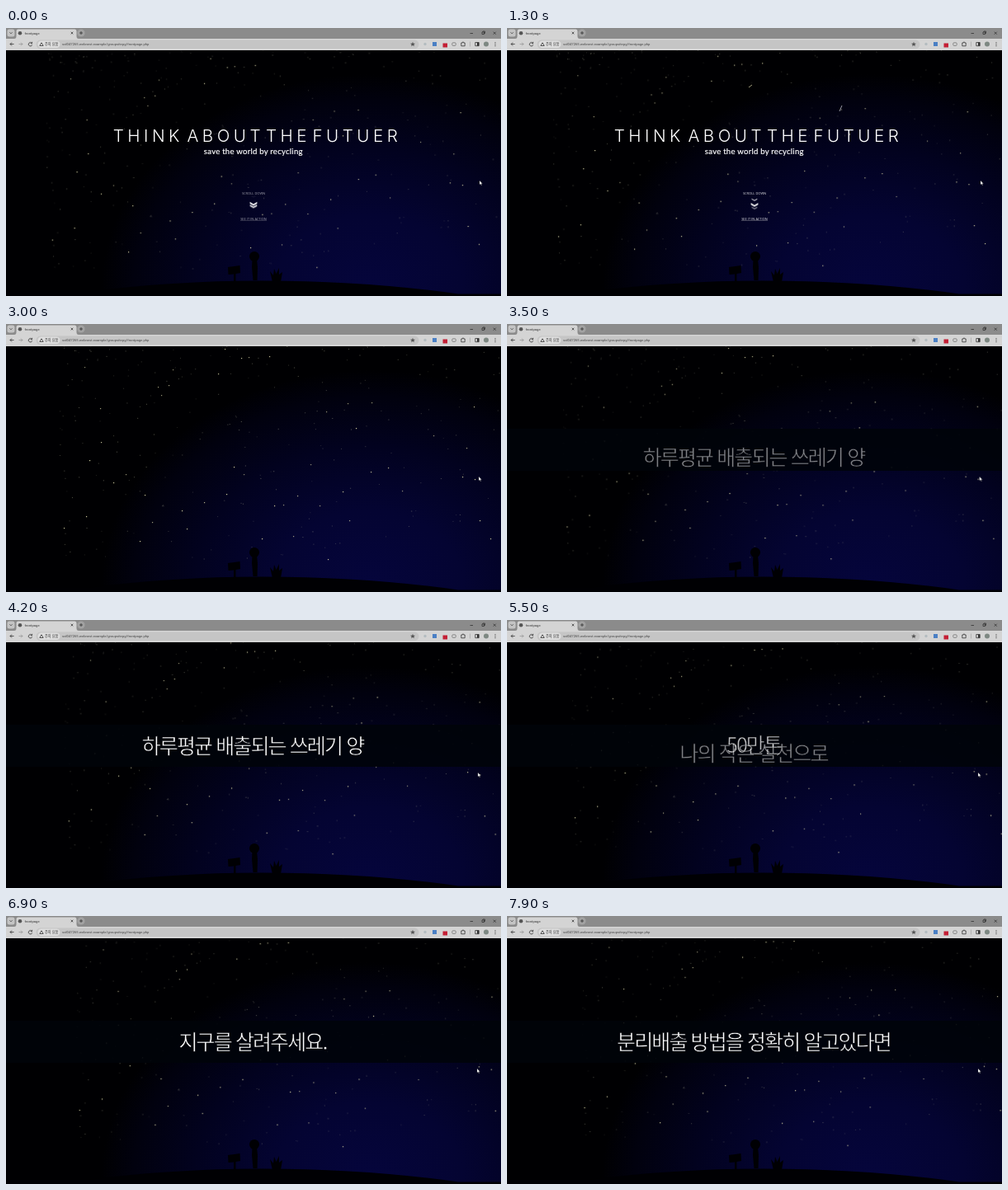
Animation of 600 by 325 pixels, one loop 8 s. Source, as an HTML page:

```html
<!DOCTYPE html>
<html lang="ko">
<head>
<meta charset="utf-8">
<title>Night sky</title>
<style>
  html, body { margin: 0; width: 100%; height: 100%; overflow: hidden; background: #000; }
  svg { display: block; width: 600px; height: 325px; }

  .ui { font: 4.2px Roboto, "Noto Sans CJK KR", sans-serif; fill: #333; }
  .icon { fill: none; stroke: #333; stroke-width: .8; }
  .mid { text-anchor: middle; fill: #fff; }
  .title { font: 300 20.6px Inter, sans-serif; letter-spacing: 4.5px; }
  .sub { font: 9.6px Lato, sans-serif; letter-spacing: .24px; stroke: #fff; stroke-width: .2; }
  .hint { font: 4px "Open Sans", sans-serif; }
  /* the dark outline thins the strokes of the letters */
  .line {
    font: 300 25px "Noto Sans CJK KR Light", "Noto Sans CJK KR", "Noto Sans CJK", sans-serif;
    letter-spacing: -1.9px; stroke: #01040a; stroke-width: .5;
  }

  .stars { transform-origin: 700px 1200px; animation: turn 8s linear both; }
  .hero { animation: leave .5s linear 2s both; }
  .pulse { animation: pulse 2s linear -1s infinite alternate; }
  .band { animation: appear .2s linear 3.3s both; }
  .line { animation: pass 1.3s linear both; }
  .chev { animation: sink 3s ease-out infinite; }
  .meteor { animation: streak .4s linear 1.1s both; }
  .cursor { animation: drift 3.2s linear 2s both; }

  @keyframes turn { from { transform: rotate(-.86deg); } to { transform: rotate(1.43deg); } }
  @keyframes leave { to { opacity: 0; } }
  @keyframes pulse { from { opacity: .25; } }
  @keyframes appear { from { opacity: 0; } }
  @keyframes pass {
    0% { opacity: 0; transform: translateY(19px); }
    23%, 84.6% { opacity: 1; transform: none; }
    100% { opacity: 0; transform: translateY(-5px); }
  }
  @keyframes sink {
    0% { opacity: 0; transform: scale(.5); }
    25% { opacity: 1; }
    33% { opacity: 1; transform: translateY(9.4px); }
    67% { opacity: 1; transform: translateY(12.5px); }
    100% { opacity: 0; transform: translateY(17.2px) scale(.5); }
  }
  @keyframes streak {
    0% { opacity: 0; transform: translate(2px, -4px); }
    50% { opacity: 1; transform: none; }
    100% { opacity: 0; transform: translate(-2px, 4px); }
  }
  @keyframes drift { to { transform: translateX(-3px); } }
</style>
</head>
<body>
<svg viewBox="0 0 600 325">
  <defs>
    <radialGradient id="glow" gradientUnits="userSpaceOnUse" cx="0" cy="0" r="1"
      gradientTransform="translate(440 318) scale(325 262)">
      <stop offset="0" stop-color="#05053c"/>
      <stop offset=".35" stop-color="#040432"/>
      <stop offset=".65" stop-color="#02021f"/>
      <stop offset=".88" stop-color="#01010e"/>
      <stop offset="1" stop-color="#000002"/>
    </radialGradient>
    <clipPath id="page"><path d="M0 27H600V325H0z"/></clipPath>
    <path id="arrow" d="M-4.4-2.300 0 .2 4.400-2.300V-.2L0 2.300-4.400-.2z" fill="#fff"/>
  </defs>

  <g clip-path="url(#page)">
    <path d="M0 27H600V325H0z" fill="url(#glow)"/>
    <g class="stars" id="stars"></g>
    <path class="meteor" d="M406 94 403 101" stroke="#aaaab4" stroke-width=".9"/>
    <path class="meteor" d="M297 69 293 72" stroke="#b4b08c" stroke-width=".9"/>

    <!-- hill, signpost, child, grass -->
    <g fill="#000003">
      <path d="M0 325V320H100Q200 306.500 310 306.500Q440 307 548 322.500H600V325z"/>
      <path d="M269 290 283.500 288 284 297 278.500 298V308H276V298.500L269.500 299z"/>
      <circle cx="301" cy="277" r="6"/>
      <path d="M298.500 281H304L305 290 304.500 306H299.500L298 290z"/>
      <path d="M320 295 324 300 325 292 327.500 298 331 291 331 299 335 296 333 308H323z"/>
    </g>

    <g class="hero">
      <text class="mid title" y="138">
        <tspan x="172.300">THINK</tspan><tspan x="266.300">ABOUT</tspan><tspan x="342">THE</tspan><tspan x="425.300">FUTUER</tspan>
      </text>
      <text class="mid sub" x="299.800" y="153">save the world by recycling</text>
      <g transform="translate(300 203.500)">
        <use class="chev" href="#arrow" style="animation-delay: -.05s"/>
        <use class="chev" href="#arrow" style="animation-delay: -1.05s"/>
        <use class="chev" href="#arrow" style="animation-delay: -2.05s"/>
      </g>
      <g class="pulse">
        <text class="mid hint" x="300" y="201.800">SCROLL DOWN</text>
        <text class="mid hint" x="300" y="232.700">SEE IT IN ACTION</text>
        <path d="M284 233.500H316" stroke="#bbb" stroke-width=".4"/>
      </g>
    </g>

    <path class="band" d="M0 127H600V178H0z" fill="#01040a" fill-opacity=".88"/>
    <g id="lines"></g>
  </g>

  <!-- browser window -->
  <g class="ui">
    <path d="M0 0H600V14H0z" fill="#8b8b8b"/>
    <path d="M0 13H600V27H0z" fill="#d4d4d4"/>
    <rect x="1.5" y="1.5" width="9" height="9" rx="2.5" fill="#c4c4c4"/>
    <path d="M10 13Q12.5 13 12.5 10V4Q12.5 1.5 15 1.5H83Q85.5 1.5 85.5 4V10Q85.5 13 88 13z" fill="#d4d4d4"/>
    <circle cx="91" cy="6" r="4.6" fill="#a2a2a2"/>
    <circle cx="17" cy="6.3" r="2.3" fill="#555"/>
    <text x="22.5" y="7.8">frontpage</text>
    <g class="icon">
      <path d="M4.5 5.3 6 6.8 7.5 5.3M78.7 4.8 81.3 7.4M81.3 4.8 78.7 7.4M89 6H93M91 4V8"/>
      <path d="M562.5 6.5H566M577 5H579.5V7.5H577zM578 5V4H580.5V6.5H579.5M590.8 4.7 593.8 7.7M593.8 4.7 590.8 7.7"/>
      <path d="M9.5 19.5H5M7 17.5 5 19.5 7 21.5"/>
      <path d="M15.5 19.5H20M18 17.5 20 19.5 18 21.5" stroke="#999"/>
      <path d="M31.3 18.5A2.2 2.2 0 1 0 31.6 20.4M31.6 16.8V18.7H29.7"/>
    </g>

    <rect x="36.5" y="14.5" width="464" height="10.5" rx="5.2" fill="#c5c5c5"/>
    <rect x="38.5" y="15.5" width="27" height="8.5" rx="4.2" fill="#dedede"/>
    <path class="icon" d="M43 17.8 45.2 21.5H40.8z" stroke-width=".6"/>
    <text x="47" y="21.3">주의 요함</text>
    <text x="68" y="21.2" fill="#444">sol047265.webnest.example/groupsitepg/frontpage.php</text>
    <path d="M493 16.7 493.8 18.7 496 18.8 494.3 20.2 494.9 22.3 493 21.1 491.1 22.3 491.7 20.2 490 18.8 492.2 18.7z" fill="#555"/>
    <circle cx="508" cy="19.5" r="1.7" fill="#b4bcc0"/>
    <rect x="517" y="17" width="5" height="5" fill="#4a7fc4"/>
    <rect x="529.5" y="18.5" width="5.5" height="5" fill="#c41f35"/>
    <g class="icon">
      <rect x="540.8" y="17.8" width="4.4" height="3.6" rx="1" stroke="#777"/>
      <path d="M551.8 18H553.2V17.2H554.8V18H556.2V21.8H551.8z"/>
      <path d="M562.5 16.5V22.5" stroke="#aaa"/>
      <path d="M568.8 17.5H573.2V21.7H568.8z"/>
    </g>
    <path d="M571 17.5H573.2V21.7H571z"/>
    <circle cx="582" cy="19.5" r="3" fill="#7d8882"/>
    <path d="M593 17.2V22.2" stroke="#333" stroke-dasharray="1 1"/>
  </g>

  <path class="cursor" d="M574 185V190L575.2 189 576 190.8 576.8 190.4 576 188.7H577.5z"
    fill="#fff" stroke="#222" stroke-width=".3"/>
</svg>

<script>
  const LOOP = 8000, STEP = 100;
  const NS = 'http://www.w3.org/2000/svg';

  function add(parent, tag, attrs, text = '') {
    const el = document.createElementNS(NS, tag);
    for (const key in attrs) el.setAttribute(key, attrs[key]);
    el.textContent = text;
    document.getElementById(parent).append(el);
    return el;
  }

  function star(x, y, size, fill, opacity) {
    add('stars', 'rect', { x, y, width: size, height: size, fill, opacity });
  }

  let seed = 41;
  const random = () => (seed = seed * 16807 % 2147483647) / 2147483647;

  const bright = [
    95, 52, 114, 102, 101, 165, 115, 143, 70, 247, 97, 233, 162, 263, 130, 192, 168, 207, 177, 240,
    219, 248, 184, 76, 202, 55, 197, 74, 188, 86, 257, 60, 265, 30, 294, 40, 285, 41, 319, 39,
    369, 170, 414, 96, 443, 95, 388, 106, 442, 179, 463, 174, 553, 185, 568, 188, 480, 202, 390, 285,
    416, 238, 380, 220, 408, 203, 325, 220, 336, 219, 353, 208, 276, 173, 288, 182, 240, 216, 267, 206,
    518, 135, 558, 150, 567, 100, 574, 238, 587, 260, 424, 126, 310, 260, 348, 257, 145, 182, 213, 226
  ];
  for (let i = 0; i < bright.length; i += 2) {
    star(bright[i], bright[i + 1], 1.2, '#d0cca0', .65 + .35 * random());
  }
  // Faint stars gather towards the upper left.
  for (let i = 0; i < 280; i++) {
    star(65 + 560 * random() ** 1.4, 20 + 265 * random() ** 1.5, 1, '#a4a48c', .15 + .4 * random());
  }

  const lines = [
    '하루평균 배출되는 쓰레기 양',
    '50만톤',
    '나의 작은 실천으로',
    '지구를 살려주세요.',
    '분리배출 방법을 정확히 알고있다면'
  ];
  lines.forEach((text, i) => {
    const el = add('lines', 'text', { class: 'mid line', x: 299, y: 162 }, text);
    el.style.animationDelay = 3350 + 1000 * i + 'ms';
  });

  // One clock drives every keyframe animation, so all parts restart together.
  const parts = document.getAnimations();
  parts.forEach(part => part.pause());
  const start = performance.now();

  function tick() {
    const time = Math.max(0, performance.now() - start) % LOOP;
    const now = Math.floor(time / STEP) * STEP;
    parts.forEach(part => { part.currentTime = now; });
    requestAnimationFrame(tick);
  }
  tick();
</script>
</body>
</html>
```
